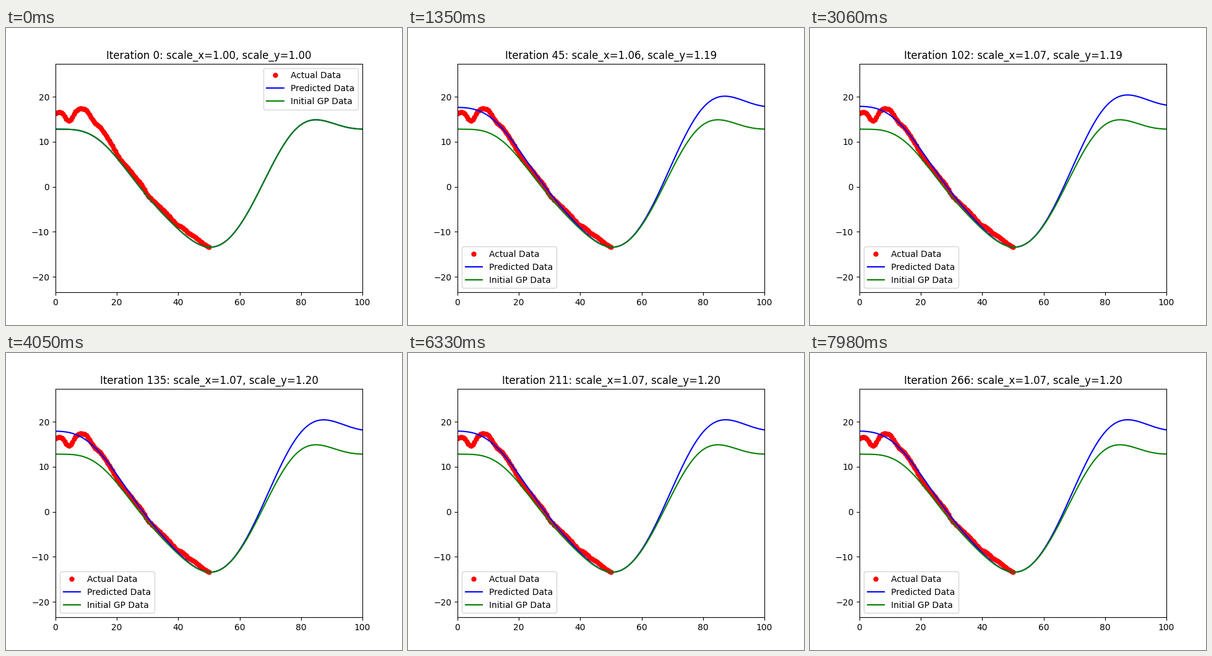
Write a matplotlib script that moves like this. It is 640 px wide and 480 px high and loops after 8 s.

```python
import numpy as np
import matplotlib.pyplot as plt
from matplotlib.animation import FuncAnimation

LOOP_MS = 8000
FRAMES = 267
PERIOD = 100
PIVOT_X, PIVOT_Y = 50, -13.4

# Heights of the periodic prior curve, one every 10 units.
HEIGHTS = [12.82, 12.05, 6.4, -2.2, -9.4, PIVOT_Y, -8.6, 4.0, 13.8, 14.2]

# Turning points of the observed track.
TRACK_X = [0, 1.4, 2.6, 4.2, 5.3, 6.4, 8.2, 10, 12.6, 14.6, 18, 20.7,
           28, 30, 36, 39.6, 41.5, 43.3, 45.5, 48, 50]
TRACK_Y = [16.3, 16.8, 16.1, 14.4, 15.1, 16.8, 17.5, 17.1, 14.3, 13.3, 9.8, 6.4,
           0.6, -1.9, -5.8, -8.5, -9.0, -10.3, -11.1, -12.6, PIVOT_Y]


def prior(x):
    """Trigonometric interpolation through HEIGHTS."""
    coef = np.fft.rfft(HEIGHTS) / len(HEIGHTS)
    coef[1:-1] *= 2
    k = np.arange(len(coef))
    return (np.exp(2j * np.pi * np.outer(x, k) / PERIOD) @ coef).real


def predict(x, sx, sy):
    """Stretch the prior about the last observed point."""
    return PIVOT_Y + sy * (prior(PIVOT_X + (x - PIVOT_X) / sx) - PIVOT_Y)


def scales(n):
    """Both scales settle exponentially; y has a fast and a slow part."""
    sx = 1 + 0.072 * (1 - np.exp(-0.05 * n))
    sy = 1.1965 - 0.1585 * np.exp(-0.104 * n) - 0.038 * np.exp(-0.03 * n)
    return sx, sy


def observed(x):
    y = np.pad(np.interp(x, TRACK_X, TRACK_Y), 1, mode="edge")
    return (y[:-2] + 2 * y[1:-1] + y[2:]) / 4


x = np.linspace(0, PERIOD, 201)
x_obs = x[x <= PIVOT_X]

fig, ax = plt.subplots(figsize=(6.4, 4.8), dpi=100)
ax.plot(x_obs, observed(x_obs), "ro", markersize=5, label="Actual Data")
pred_line, = ax.plot(x, prior(x), "b-", label="Predicted Data")
ax.plot(x, prior(x), "g-", label="Initial GP Data")
ax.set_xlim(0, PERIOD)
ax.set_ylim(-23.45, 27.37)
ax.legend(loc="best")
title = ax.set_title("")


def update(n):
    sx, sy = scales(n)
    pred_line.set_ydata(predict(x, sx, sy))
    title.set_text(f"Iteration {n}: scale_x={sx:.2f}, scale_y={sy:.2f}")
    return pred_line, title


anim = FuncAnimation(fig, update, frames=FRAMES, interval=LOOP_MS / FRAMES,
                     init_func=lambda: update(0), repeat=True, repeat_delay=0)
plt.show()
```
